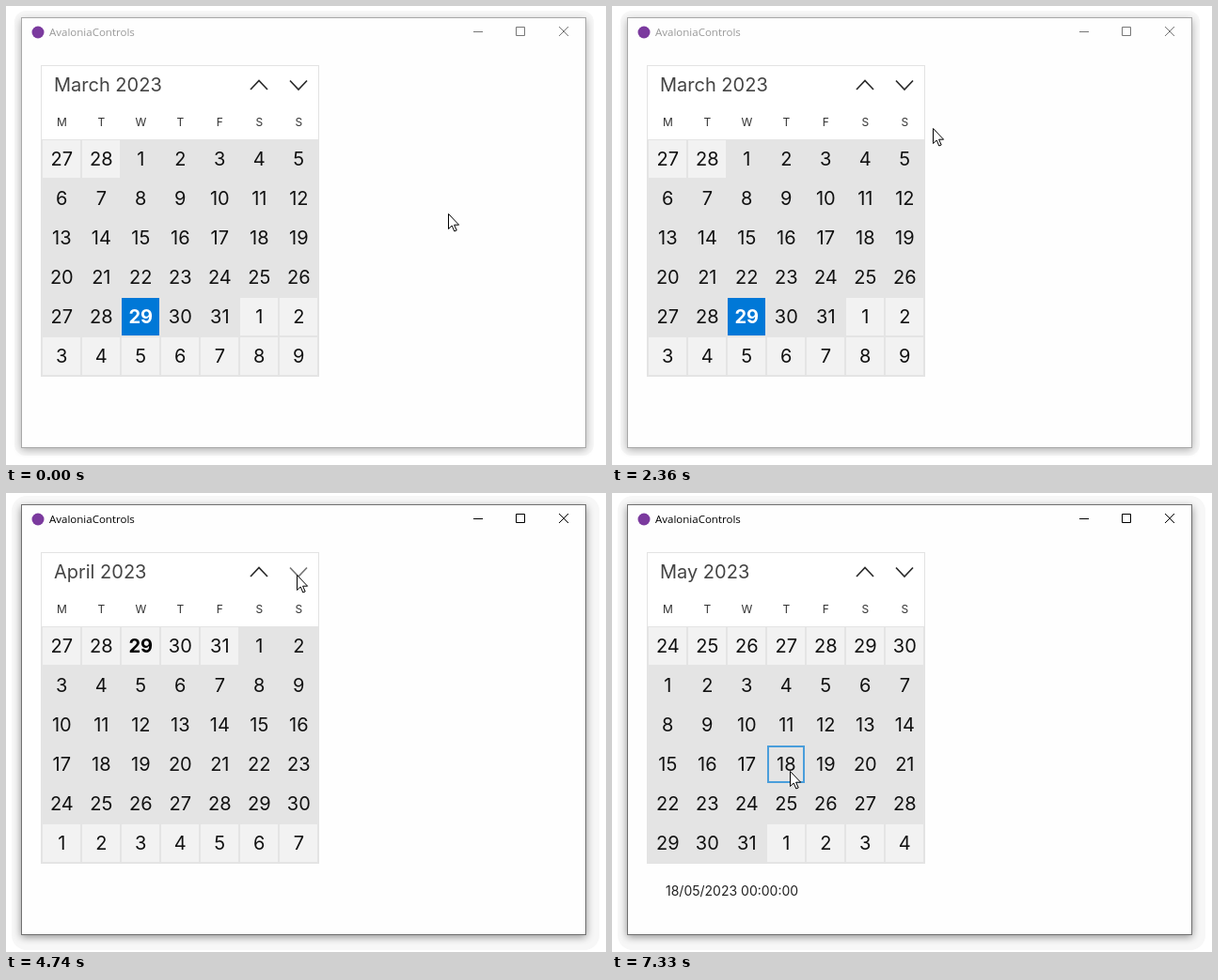
These frames come from a looping animation (638x489 px, 8000 ms). An HTML page:

```html
<!DOCTYPE html>
<html lang="en">
<head>
<meta charset="utf-8">
<title>Calendar</title>
<style>
  html, body { margin: 0; width: 100%; height: 100%; overflow: hidden; background: #fff; }
  svg { display: block; }
  text { font-family: Inter, sans-serif; fill: #111; }
  .caption { font: 11.5px "Open Sans", sans-serif; }
  .month { font-size: 20px; fill: #444; }
  .weekday { font-size: 12px; fill: #333; text-anchor: middle; }
  .day { font-size: 20px; text-anchor: middle; }
  .line { fill: none; }
</style>
</head>
<body>
<svg width="638" height="489" viewBox="0 0 638 489">
  <defs>
    <filter id="blur" x="-10%" y="-10%" width="120%" height="120%"><feGaussianBlur stdDeviation="4"/></filter>
  </defs>
  <rect id="halo" fill="#f7f7f7"/>
  <rect id="shadow" x="16" y="15" width="601" height="458" filter="url(#blur)"/>
  <rect id="frame" x="16.5" y="12.5" width="600" height="458" fill="#fefefe"/>

  <circle cx="34" cy="28" r="6.5" fill="#7b3a9e"/>
  <text id="caption" class="caption" x="46" y="32">AvaloniaControls</text>
  <path id="buttons" class="line" d="M497 27.5h10M542.5 22.5h9v9h-9zM588 22l10 10M598 22l-10 10"/>

  <rect x="37.5" y="63.5" width="295" height="331" fill="#fff" stroke="#e3e3e3"/>
  <rect x="38" y="142" width="294" height="252" fill="#e4e4e4"/>
  <text id="month" class="month" x="51" y="91"></text>
  <path class="line" d="M260 89l9-9.5l9 9.5" stroke="#2b2b2b" stroke-width="1.7"/>
  <path id="next" class="line" d="M302 79.5l9 9.5l9-9.5"/>
  <g id="weekdays"></g>
  <g id="days"></g>
  <rect id="outline" class="line" width="38" height="38" stroke-width="2"/>
  <text id="result" x="57" y="429" font-size="14" style="fill:#222">18/05/2023 00:00:00</text>

  <path id="cursor" d="M.5 .5v16l3.7-3.5l2.6 6l2.4-1l-2.6-5.8h5z" fill="#fff" stroke="#000"/>
</svg>
<script>
const LOOP = 8000;
const CELL = 42, GRID_X = 39, GRID_Y = 143;
const ACTIVATE = 3260, SELECT = 7220;
const PRESSES = [[3260, 3430], [4740, 4900]];

// Pointer path: time, x, y
const PATH = [
  [0, 470, 221], [690, 470, 221], [940, 459, 217], [1140, 459, 217],
  [1780, 379, 166], [1950, 370, 163], [2000, 370, 163], [2400, 338, 126],
  [2780, 309, 92], [2840, 309, 89], [2900, 309, 87], [5110, 309, 87],
  [5220, 309, 91], [5399, 309, 91], [5400, 309, 94], [5660, 309, 94],
  [5950, 285, 153], [6200, 236, 235], [6400, 202, 300], [6500, 194, 300],
  [6670, 190, 297], [6840, 189, 296], [LOOP, 189, 296]
];

const $ = id => document.getElementById(id);
const set = (id, attributes) => {
  for (const name in attributes) $(id).setAttribute(name, attributes[name]);
};

function pointerAt(t) {
  const i = PATH.findIndex(point => point[0] > t);
  const [t0, x0, y0] = PATH[i - 1], [t1, x1, y1] = PATH[i];
  const k = (t - t0) / (t1 - t0);
  return [Math.round(x0 + (x1 - x0) * k), Math.round(y0 + (y1 - y0) * k)];
}

// The grid always begins with at least one day of the previous month.
const leadingDays = month => (new Date(2023, month, 1).getDay() + 6) % 7 || 7;
const dateAt = (month, index) => new Date(2023, month, 1 - leadingDays(month) + index);

let shownMonth;
function showMonth(month) {
  if (month === shownMonth) return;
  shownMonth = month;
  $('month').textContent = ['March', 'April', 'May'][month - 2] + ' 2023';
  let markup = '';
  for (let i = 0; i < 42; i++) {
    const date = dateAt(month, i), day = date.getDate();
    const x = GRID_X + i % 7 * CELL, y = GRID_Y + Math.floor(i / 7) * CELL;
    const outside = date.getMonth() !== month;
    const today = date.getMonth() === 2 && day === 29;
    const fill = outside ? '#f2f2f2' : today ? '#0078d7' : 'none';
    const style = today ? `font-weight:700;fill:${outside ? '#000' : '#fff'}` : '';
    markup += `<rect x="${x}" y="${y}" width="40" height="40" fill="${fill}"/>` +
      `<text class="day" x="${x + 20.3}" y="${y + 27}" style="${style}">${day}</text>`;
  }
  $('days').innerHTML = markup;
}

function showWindow(active) {
  set('halo', active
    ? { x: 6, y: 3, width: 625, height: 484, rx: 16 }
    : { x: 9, y: 5, width: 616, height: 474, rx: 12 });
  set('shadow', { opacity: active ? 0.42 : 0.3 });
  set('frame', { stroke: active ? '#707070' : '#a8a8a8' });
  set('buttons', { stroke: active ? '#000' : '#777' });
  $('caption').style.fill = active ? '#000' : '#999';
}

function showOutline(t, x, y) {
  const column = Math.floor((x - GRID_X) / CELL), row = Math.floor((y - GRID_Y) / CELL);
  const inGrid = column >= 0 && column < 7 && row >= 0 && row < 6;
  const hovered = inGrid && dateAt(shownMonth, row * 7 + column).getMonth() === shownMonth;
  set('outline', {
    x: GRID_X + column * CELL + 1,
    y: GRID_Y + row * CELL + 1,
    stroke: !hovered ? 'none' : t >= SELECT ? '#4a9edb' : '#7d7d7d'
  });
}

function draw(t) {
  const [x, y] = pointerAt(t);
  const pressed = PRESSES.some(([down, up]) => t >= down && t < up);
  const overNext = x > 290 && x < 332 && y > 64 && y < 104;
  showWindow(t >= ACTIVATE);
  showMonth(2 + PRESSES.filter(([, up]) => t >= up).length);
  showOutline(t, x, y);
  set('next', {
    stroke: pressed ? '#777' : overNext ? '#000' : '#2b2b2b',
    'stroke-width': overNext && !pressed ? 2 : 1.7
  });
  set('result', { visibility: t >= SELECT + 60 ? 'visible' : 'hidden' });
  set('cursor', { transform: `translate(${x} ${y})` });
}

$('weekdays').innerHTML = [...'MTWTFSS'].map((letter, i) =>
  `<text class="weekday" x="${GRID_X + 20.3 + i * CELL}" y="128">${letter}</text>`).join('');

const start = performance.now();
function tick() {
  draw((performance.now() - start) % LOOP);
  requestAnimationFrame(tick);
}
tick();
</script>
</body>
</html>
```
